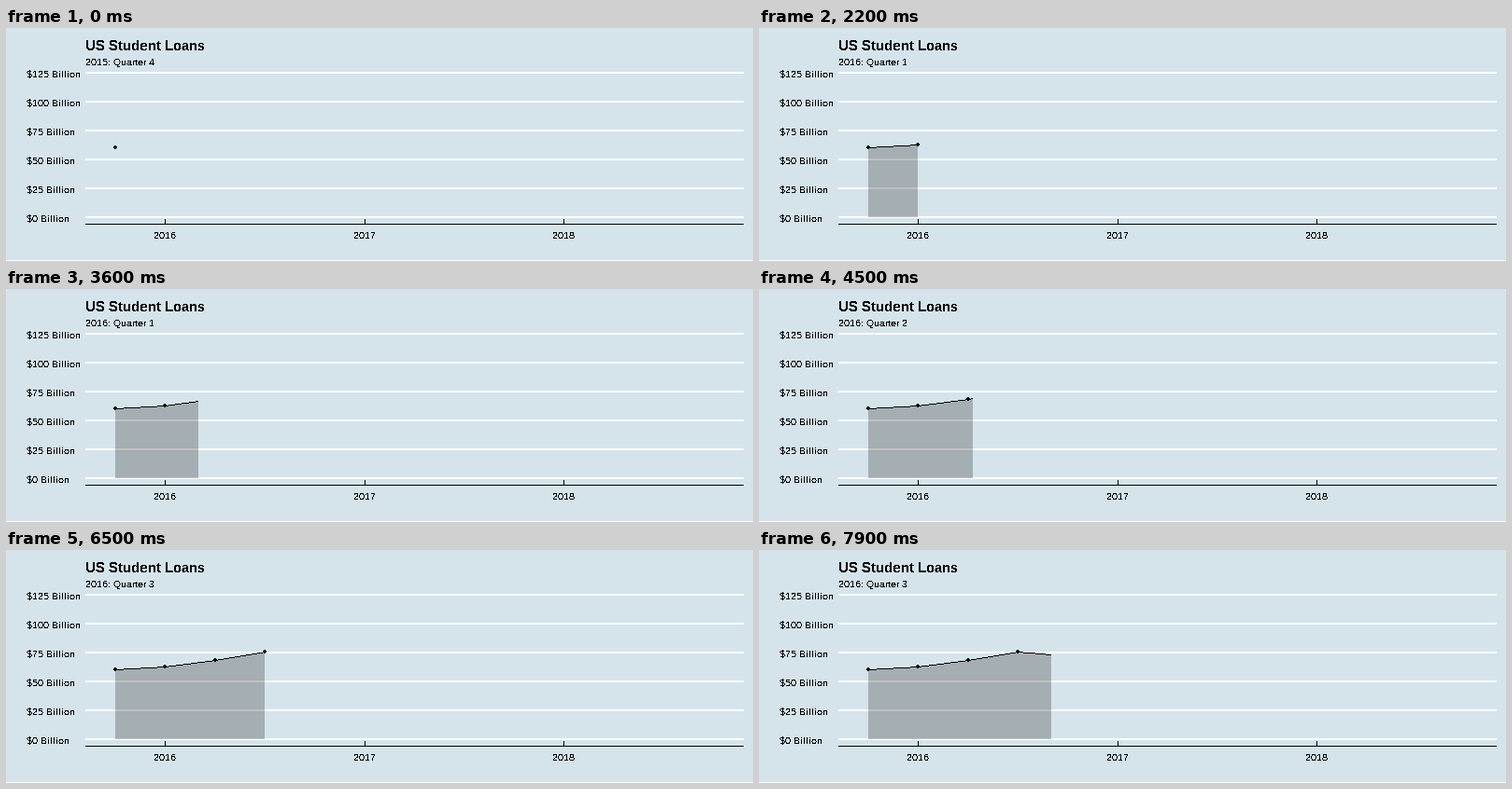
Write a matplotlib script that moves like this. It is 800 by 250 pixels and loops after 8000 ms.

```python
import matplotlib.pyplot as plt
import numpy as np
from matplotlib.animation import FuncAnimation
from matplotlib.patches import Circle, Rectangle, StepPatch

plt.rcParams.update({
    "font.family": "Liberation Sans",
    "text.hinting": "native",
    "text.hinting_factor": 1,
    "text.antialiased": False,
})

W, H, DPI = 800, 250, 72  # at 72 dpi one point is one pixel
FRAMES, STEP_MS = 80, 100
LEFT, RIGHT = 85, 790
ZERO_Y, GRID_STEP = 203, 31

# Quarterly points: time reached (in steps), x by day of the year, y in pixels
KEYS = np.array([0, 22, 43, 65, 86])
DAYS = np.array([0, 92, 183, 274, 366])
XS = 116.7 + 0.5847 * DAYS
YS = np.array([128, 125, 118, 109, 114])

QUARTERS = ["2015: Quarter 4", "2016: Quarter 1",
            "2016: Quarter 2", "2016: Quarter 3"]
LEAD = 0.15  # the subtitle turns over slightly early, in quarters

fig = plt.figure(figsize=(W / DPI, H / DPI), dpi=DPI, facecolor="#D5E4EB")
ax = fig.add_axes([0, 0, 1, 1])
ax.set(xlim=(0, W), ylim=(H, 0))
ax.axis("off")


def box(x, y, w, h, color, z):
    ax.add_patch(Rectangle((x, y), w, h, fc=color, lw=0, aa=False, zorder=z))


def label(x, y, text, size=10, **kw):
    return ax.text(x, y, text, size=size, color="black",
                   va="baseline", zorder=6, **kw)


def steps(color, base, **kw):
    return ax.add_patch(StepPatch([0], [0, 1], baseline=base, fill=True,
                                  fc=color, lw=0, snap=False, **kw))


label(LEFT, 24, "US Student Loans", 15, weight="bold")
subtitle = label(LEFT, 40, QUARTERS[0])

for i in range(6):
    y = ZERO_Y - GRID_STEP * i
    box(LEFT, y - 1, RIGHT - LEFT, 2, "white", 1)
    label(22, y + 5, rf"\${25 * i} Billion")

box(LEFT, 210, RIGHT - LEFT, 1, "black", 5)
for year, x in ((2016, 170), (2017, 384), (2018, 597)):
    box(x, 205, 1, 5, "black", 5)
    label(x, 226, str(year), ha="center")
box(0, H - 1, W, 1, "white", 1)

area = steps("#333333", ZERO_Y, alpha=0.3, zorder=2)
line = steps("black", [0], zorder=3)
# Unsmoothed, this radius fills a 4 px dot without its corners
dots = [ax.add_patch(Circle((round(x), y), 1.3, fc="black", lw=0,
                            aa=False, snap=False, zorder=4))
        for x, y in zip(XS[:4], YS)]


def draw(frame):
    past = KEYS < frame
    xs = np.round(np.append(XS[past], np.interp(frame, KEYS, XS)))
    ys = np.round(np.append(YS[past], np.interp(frame, KEYS, YS)))
    if frame:
        edges = np.arange(xs[0], xs[-1] + 1)
        rows = np.round(np.interp(edges[:-1], xs, ys))
        area.set_data(rows, edges)
        line.set_data(rows, edges, rows + 1)
    for shape in (area, line):
        shape.set_visible(frame > 0)
    for key, dot in zip(KEYS, dots):
        dot.set_visible(frame >= key)
    quarter = np.interp(frame, KEYS, range(len(KEYS)))
    subtitle.set_text(QUARTERS[int(quarter + LEAD)])
    return [area, line, subtitle, *dots]


anim = FuncAnimation(fig, draw, frames=FRAMES, interval=STEP_MS,
                     init_func=lambda: draw(0), repeat=True, repeat_delay=0)
plt.show()
```
